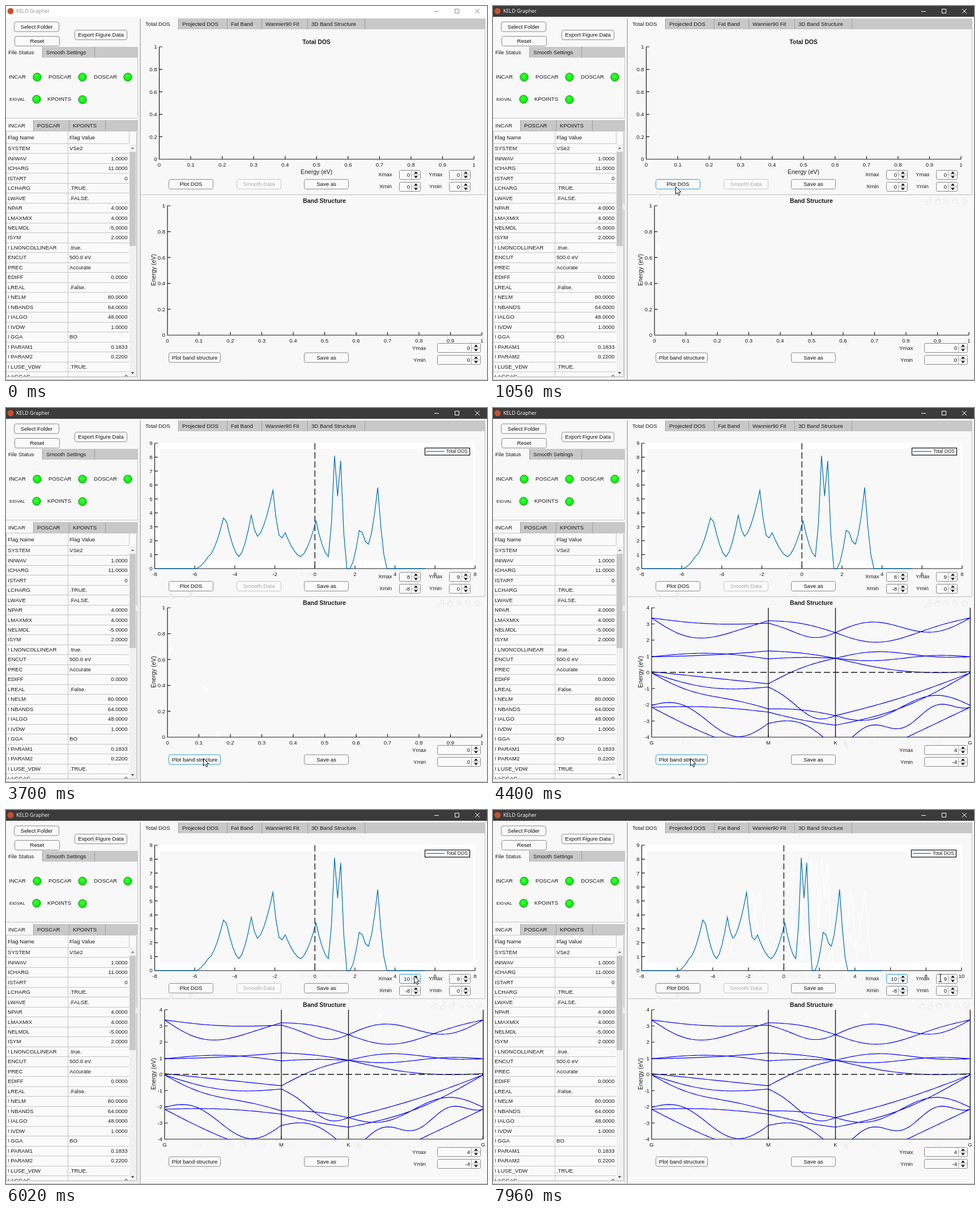
Animation, 849 px wide and 659 px high, one loop 8 s. Source, as an HTML page with a canvas:

```html
<!DOCTYPE html>
<html lang="en">
<head>
<meta charset="utf-8">
<title>KELD Grapher</title>
<style>
html, body { margin: 0; width: 849px; height: 659px; overflow: hidden; background: #f8f8f8; }
canvas { display: block; width: 849px; height: 659px; }
</style>
</head>
<body>
<canvas id="stage" width="849" height="659"></canvas>
<script>
const ctx = document.getElementById('stage').getContext('2d');
const LOOP = 8000, STEP = 76;
const BG = '#f8f8f8', INK = '#1a1a1a', GREY = '#c8c8c8', EDGE = '#8a8a8a', RULE = '#c4c4c4', FOCUS = '#2f9be0', FAINT = '#efefef';

// Turning points of the density curve: [sample, states].
const dosTurns = [[0, 0], [4, .85], [9.4, 4], [14, .86], [18, 3.83], [20, 2.32], [25, 5.62], [27.5, 2.13],
  [29, 2.57], [34, .86], [39, 3.42], [43, .86], [45, 8.1], [46, 5.2], [47, 7.74], [49, 0], [50, 0],
  [53.3, 3.2], [55.8, 1.7], [59, 5.82], [62, 0]];

// Band branches between two symmetry points: [from, to, bow, skew, ripple], in eV.
const stretches = [
  { x0: 280, x1: 486, branches: [
    [3.37, 3.2, -1.12, -.18], [3.37, 3.05, -.2], [.97, .84, .28], [.97, 1.33, -.07], [.05, -.7],
    [-.03, -.9, -.47], [-.03, -2.25, -.3, -.13], [-2.03, -3.15, -.53, .72], [-2.15, -2.45, .16], [-2.15, -5.1, -.26]] },
  { x0: 486, x1: 604.5, branches: [
    [3.2, 2.46, .19], [3.05, 2.46, -.44, .13], [1.33, .88, .09], [.84, .88, .07], [-.7, .88, .2],
    [-.9, -2.67, -.56, .24], [-2.25, -2.67, .14], [-2.45, -3.26, -.08], [-3.15, -4.7, .77]] },
  { x0: 604.5, x1: 842, branches: [
    [2.46, 3.37, -.14, .52], [2.46, 3.37, -.77, -.25], [.88, .97, .26, .17], [.88, .97, -.05, -.14], [.88, .05, -.37],
    [-2.67, -.03, -.18], [-3.26, -.03, -.5], [-2.67, -2.03, .25, -.6], [-4.7, -2.15, 0, 0, .77], [-6.1, -2.15]] }];

// Pointer waypoints: [time, x, y].
const waypoints = [[130, 619, 584], [290, 288, 417], [370, 228, 346], [520, 288, 322], [740, 322, 318],
  [3010, 322, 318], [3240, 348, 488], [3400, 370, 569], [3630, 348, 617], [4400, 348, 617], [4480, 417, 578],
  [4640, 587, 461], [4790, 656, 354], [5010, 708, 303], [5400, 720, 292], [6860, 720, 291],
  [7200, 707, 297], [7350, 705, 297], [7960, 789, 296]];

const tableRows = `SYSTEM|VSe2
INIWAV|1.0000
ICHARG|11.0000
ISTART|0
LCHARG|.TRUE.
LWAVE|.FALSE.
NPAR|4.0000
LMAXMIX|4.0000
NELMDL|-5.0000
ISYM|2.0000
! LNONCOLLINEAR|.true.
ENCUT|500.0 eV
PREC|Accurate
EDIFF|0.0000
LREAL|.False.
! NELM|80.0000
! NBANDS|64.0000
! IALGO|48.0000
! IVDW|1.0000
! GGA|BO
! PARAM1|0.1833
! PARAM2|0.2200
! LUSE_VDW|.TRUE.
LAGGAC|0`.split('\n').map(row => row.split('|'));

// ---- drawing helpers ----
const lerp = (a, b, u) => a + (b - a) * u;
function text(str, x, cy, { align = 'left', color = INK, size = 9.6, bold = false, font = '"Liberation Sans", Arial, sans-serif' } = {}) {
  ctx.font = `${bold ? 'bold ' : ''}${size}px ${font}`;
  ctx.textAlign = align;
  ctx.fillStyle = color;
  ctx.fillText(str, x, cy + size * 0.36);
}
function rect(x, y, w, h, color) {
  ctx.fillStyle = color;
  ctx.fillRect(x, y, w, h);
}
function lines(color, width, ...polylines) {
  ctx.strokeStyle = color;
  ctx.lineWidth = width;
  ctx.beginPath();
  for (const pts of polylines) pts.forEach(([x, y], i) => i ? ctx.lineTo(x, y) : ctx.moveTo(x, y));
  ctx.stroke();
}
const hline = (x0, x1, y, color, width = 1) => lines(color, width, [[x0, y], [x1, y]]);
const vline = (x, y0, y1, color, width = 1) => lines(color, width, [[x, y0], [x, y1]]);
function polygon(pts, fill, stroke) {
  ctx.beginPath();
  pts.forEach(([x, y]) => ctx.lineTo(x, y));
  ctx.closePath();
  ctx.fillStyle = fill;
  ctx.fill();
  if (stroke) { ctx.strokeStyle = stroke; ctx.lineWidth = 1; ctx.stroke(); }
}
const triangle = (cx, y, h, color, half = 3.5) => polygon([[cx - half, y], [cx + half, y], [cx, y + h]], color);
function disc(x, y, r, fill, stroke) {
  ctx.beginPath();
  ctx.arc(x, y, r, 0, 7);
  if (fill) { ctx.fillStyle = fill; ctx.fill(); }
  if (stroke) { ctx.strokeStyle = stroke; ctx.lineWidth = 1; ctx.stroke(); }
}
function roundBox(x, y, w, h, fill, stroke, r = 3) {
  ctx.beginPath();
  ctx.roundRect(x + .5, y + .5, w - 1, h - 1, r);
  ctx.fillStyle = fill;
  ctx.fill();
  ctx.strokeStyle = stroke;
  ctx.lineWidth = 1;
  ctx.stroke();
}
function dashed(from, to, color) {
  ctx.setLineDash([11, 5]);
  lines(color, 1.4, [from, to]);
  ctx.setLineDash([]);
}
function button(label, x, y, w, { focus, pressed, disabled } = {}) {
  roundBox(x, y, w, 18, pressed ? '#e4e4e4' : '#fafafa', focus ? FOCUS : disabled ? RULE : EDGE);
  text(label, x + w / 2, y + 8.7, { align: 'center', color: disabled ? '#a9a9a9' : '#111' });
}
function spinner(x, y, w, value, focus) {
  const cx = x + w - 8.5;
  roundBox(x, y, w, 17, '#fafafa', focus ? FOCUS : EDGE, 2);
  vline(x + w - 16.5, y + 1, y + 16, '#b5b5b5');
  hline(x + w - 16, x + w - 1, y + 8.5, '#b5b5b5');
  text(value, x + w - 19, y + 8.5, { align: 'right' });
  triangle(cx, y + 6.5, -4, '#111');
  triangle(cx, y + 10.5, 4, '#111');
}
function tabs(x, y, end, labels, edges) {
  rect(x, y, end - x, 19, GREY);
  rect(x, y, edges[0] - x, 20, BG);
  edges.forEach(edge => vline(edge + .5, y, y + 19, '#a0a0a0'));
  labels.forEach(([label, lx]) => text(label, lx, y + 9.5));
}
function lamp(x, y) {
  const glow = ctx.createRadialGradient(x - 1, y - 2, 1, x, y, 8);
  glow.addColorStop(0, '#3dff3d');
  glow.addColorStop(.7, '#06f006');
  glow.addColorStop(1, '#00c800');
  disc(x, y, 7.3, glow, '#4f8f4f');
}
// Ticks are [position, label] pairs and point into the plot.
function axes(x0, y0, x1, y1, xTicks, yTicks, color = INK) {
  lines(color, 1.2, [[x0, y0], [x0, y1], [x1, y1]],
    ...xTicks.map(([x]) => [[x, y1], [x, y1 - 5.5]]), ...yTicks.map(([y]) => [[x0, y], [x0 + 5.5, y]]));
  xTicks.forEach(([x, label]) => text(label, x, y1 + 9.5, { align: 'center', color }));
  yTicks.forEach(([y, label]) => text(label, x0 - 4, y, { align: 'right', color }));
}
function ticks(from, to, first, last, step) {
  const count = Math.round((last - first) / step);
  return Array.from({ length: count + 1 }, (_, i) =>
    [lerp(from, to, i / count), String(+(first + i * step).toFixed(1))]);
}

// ---- plots ----
function drawEmptyDos() {
  axes(270.5, 72, 826, 270, ticks(270.5, 826, 0, 1, .1), ticks(270, 72, 0, 1, .2));
  text('Energy (eV)', 548, 292, { align: 'center', size: 10.5 });
  text('Total DOS', 548, 63, { align: 'center', bold: true, size: 10.4 });
}
// Flat valleys, sharp peaks: each rise is a power of the distance from its valley.
function dosAt(sample) {
  const next = dosTurns.findIndex(([s], i) => i && s >= sample);
  const [a, b] = [dosTurns[next - 1], dosTurns[next]].sort((p, q) => p[1] - q[1]);
  return lerp(a[1], b[1], ((sample - a[0]) / (b[0] - a[0])) ** 1.6);
}
function drawDos(xMax, ghost) {
  const right = xMax > 8 ? 827 : 828, unit = (right - 262.5) / (xMax + 8);
  const toX = energy => 262.5 + (energy + 8) * unit;
  const last = Math.floor(xMax / 2) * 2;
  axes(262.5, 62, right, 283, ticks(262.5, toX(last), -8, last, 2), ticks(283, 62, 0, 9, 1), ghost ? FAINT : INK);
  const curve = Array.from({ length: 63 }, (_, i) => [toX(i * .154 - 5.95), 283 - 24.55 * dosAt(i)]);
  lines(ghost ? '#fff' : '#0072bd', 1.25, [[262.5, 283], ...curve, [toX(5.5), 283]]);
  dashed([toX(0), 62], [toX(0), 283], ghost ? '#fff' : INK);
  if (ghost) return;
  const lx = right - 89;
  rect(lx, 70, 80, 13, '#fff');
  ctx.strokeStyle = INK;
  ctx.lineWidth = 1.3;
  ctx.strokeRect(lx + .5, 70.5, 79, 12.5);
  hline(lx + 3, lx + 35, 76.5, '#0072bd', 1.25);
  text('Total DOS', lx + 38, 76.5, { size: 8.3 });
}
function drawDosHistory(xMax) {
  text('Energy (eV)', 548, 292, { align: 'center', size: 10.5, color: FAINT });
  rect(263, 61, 565, 222, '#fff');
  rect(272, 72, 553, 197, BG);
  for (let past = 8; past < xMax; past++) drawDos(past, true);
  drawDos(xMax);
}
function drawEmptyBands() {
  axes(285, 352, 840, 580, ticks(285, 840, 0, 1, .1), ticks(580, 352, 0, 1, .2));
}
function branchPoints(x0, x1, [from, to, bow = 0, skew = 0, ripple = 0]) {
  return Array.from({ length: 41 }, (_, i) => {
    const u = i / 40, wave = Math.sin(2 * Math.PI * u);
    const energy = lerp(from, to, u) + bow * Math.sin(Math.PI * u) + skew * wave + ripple * wave * wave;
    return [lerp(x0, x1, u), 466 - 28.5 * energy];
  });
}
function drawBands() {
  ticks(285, 840, 0, 1, .1).slice(1, -1).forEach(([x, s]) => text(s, x, 589, { align: 'center', color: FAINT }));
  axes(280, 352, 842, 580, [[280, 'G'], [486, 'M'], [604.5, 'K'], [842, 'G']], ticks(580, 352, -4, 4, 1));
  ctx.save();
  ctx.beginPath();
  ctx.rect(280, 352, 563, 228);
  ctx.clip();
  for (const { x0, x1, branches } of stretches) lines('#0000ff', 1.2, ...branches.map(b => branchPoints(x0, x1, b)));
  ctx.restore();
  for (const x of [486, 604.5, 842.3]) vline(x, 352, 580, INK, 1.4);
  dashed([280, 465.7], [842, 465.7], INK);
}

// Icons run leftwards from the house; the full set adds an export icon.
function toolbar(right, full, color) {
  const icon = (slot, ...shapes) => {
    ctx.save();
    ctx.translate(right - slot * 15.9, 344);
    lines(color, 1.1, ...shapes);
    ctx.restore();
  };
  icon(0, [[-6, 0], [0, -6], [6, 0]], [[-4, -1], [-4, 5], [-1, 5], [-1, 1], [1, 1], [1, 5], [4, 5], [4, -1]]);
  for (const slot of [1, 2]) {
    disc(right - slot * 15.9 - 1, 343, 4.5, null, color);
    icon(slot, [[-3, -1], [1, -1]], [[2, 2], [6, 6]]);
  }
  icon(2, [[-1, -3], [-1, 1]]);
  icon(3, [[-3, 5], [-6, 0], [-3, 1], [-3, -4], [-1, -1], [0, -6], [1, -1], [3, -5], [3, 0], [5, -3], [3, 5], [-3, 5]]);
  icon(4, [[0, -6], [0, 0], [-3, 1], [-5, 6], [4, 6], [4, -6], [0, -6]], [[-3, 1], [4, 1]]);
  if (full) icon(5, [[-5, 1], [-5, 5], [6, 5], [6, 2]], [[-3, 2], [0, -2], [5, -2]], [[2, -5], [5, -2], [2, 1]]);
}

// ---- pointer ----
function arrow(x, y, fill, stroke) {
  polygon([[0, 0], [0, 13], [3, 10.3], [5, 15], [7.3, 14], [5.3, 9.5], [9.3, 9.3]].map(([dx, dy]) => [x + dx + .5, y + dy + .5]), fill, stroke);
}
function drawTrail(t) {
  waypoints.forEach(([, x, y], i) => {
    const next = waypoints[i + 1];
    const inBands = x > 285 && x < 830 && y > 352 && y < 575;
    if (next && t >= next[0]) arrow(x, y, inBands ? '#fff' : FAINT);
  });
}
function drawPointer(t) {
  const i = waypoints.findLastIndex(([time]) => time <= t);
  if (i < 0) return;
  const a = waypoints[i], b = waypoints[i + 1] || a;
  const held = Math.floor((t - a[0]) / STEP) * STEP;
  const u = held / (b[0] - a[0] || 1);
  const x = Math.round(lerp(a[1], b[1], u)), y = Math.round(lerp(a[2], b[2], u));
  const overField = y > 292 && y < 306 && ((x > 694 && x < 717) || (x > 782 && x < 803));
  if (overField) lines('#111', 1, [[x - 2.5, y - 6.5], [x + 3.5, y - 6.5]], [[x + .5, y - 6.5], [x + .5, y + 6.5]], [[x - 2.5, y + 6.5], [x + 3.5, y + 6.5]]);
  else arrow(x, y, '#fff', '#111');
}

// ---- window ----
function drawTitleBar(active) {
  const color = active ? '#fff' : '#8c8c8c';
  rect(0, 0, 849, 19, active ? '#3b3b3b' : '#fff');
  disc(8, 9, 5.5, '#c8502c');
  text('KELD Grapher', 18, 9, { color, size: 9, font: '"Open Sans", sans-serif' });
  lines(color, 1, [[756, 9.5], [764, 9.5]], [[792.5, 5.5], [799.5, 5.5], [799.5, 12.5], [792.5, 12.5], [792.5, 5]],
    [[828, 5], [836, 13]], [[836, 5], [828, 13]]);
}
function drawTable(hover) {
  const rowH = 17.48;
  rect(0, 221, 230, 432, '#fafafa');
  text('Flag Name', 3, 232);
  text('Flag Value', 112, 232);
  ctx.save();
  ctx.beginPath();
  ctx.rect(0, 221, 232, 432.5);
  ctx.clip();
  tableRows.forEach(([name, value], i) => {
    const cy = 250.7 + i * rowH;
    const numeric = /^-?[\d.]+$/.test(value);
    hline(0, 217, Math.round(242 + i * rowH) + .5, RULE);
    text(name, 3, cy);
    text(value, numeric ? 214.5 : 112, cy, { align: numeric ? 'right' : 'left' });
  });
  ctx.restore();
  vline(109.5, 221, 653, RULE);
  vline(217.5, 221, 242, RULE);
  rect(218, 243, 11, 410, '#f1f1f1');
  rect(218, 257, 11, 166, hover ? '#a8a8a8' : GREY);
  triangle(223.5, 252, -3.5, EDGE, 3);
  triangle(223.5, 645, 3.5, '#555', 3);
  lines('#b0b0b0', 1, [[0.5, 221], [0.5, 653.5], [230.5, 653.5], [230.5, 221]]);
  hline(0, 230, 220.5, RULE);
}
function drawLeft(hover) {
  button('Select Folder', 14, 27.5, 80);
  button('Reset', 15, 53, 80);
  button('Export Figure Data', 121, 42, 93);
  tabs(0, 72, 232, [['File Status', 4], ['Smooth Settings', 71]], [64, 156]);
  lines(RULE, 1, [[232.5, 72], [232.5, 197.5], [0, 197.5]]);
  ['INCAR', 'POSCAR', 'DOSCAR'].forEach((label, i) => {
    text(label, i ? 75 + (i - 1) * 80 : 5, 125);
    lamp(55 + i * 80, 125.3);
  });
  text('EIGVAL', 6, 164, { size: 7.8 });
  text('KPOINTS', 73, 164);
  lamp(54, 164.3);
  lamp(135, 165);
  tabs(0, 201, 232, [['INCAR', 4], ['POSCAR', 55], ['KPOINTS', 118]], [48, 111, 175]);
  vline(232.5, 201, 657, RULE);
  drawTable(hover);
}

function draw(t) {
  const during = (from, to) => t >= from && t < to;
  const plotted = t >= 2610, banded = t >= 4000;
  const xMaxValue = t >= 6000 ? 10 : t >= 5720 ? 9 : plotted ? 8 : 0;
  const xMaxPlot = t >= 6400 ? 10 : t >= 6250 ? 9 : 8;

  rect(0, 0, 849, 659, BG);
  drawTitleBar(t >= 920);
  drawLeft(during(370, 450));
  vline(237, 22, 658, '#c0c0c0', 2);
  hline(0, 849, 658.5, '#c0c0c0');
  tabs(238, 22, 845, [['Total DOS', 246], ['Projected DOS', 311], ['Fat Band', 397], ['Wannier90 Fit', 458], ['3D Band Structure', 539]], [304, 390, 451, 532, 633]);
  lines('#c0c0c0', 1, [[845.5, 22], [845.5, 332.5], [238, 332.5]]);

  drawTrail(t);
  if (plotted) drawDosHistory(xMaxPlot); else drawEmptyDos();
  [['Xmax', 657, 297], ['Xmin', 659, 318], ['Ymax', 746, 297], ['Ymin', 747, 318], ['Ymax', 717, 603], ['Ymin', 719, 624]]
    .forEach(([s, x, y]) => text(s, x, y));
  spinner(694, 289, 38, xMaxValue, t >= 5640);
  spinner(694, 310, 38, plotted ? -8 : 0);
  spinner(782, 289, 38, plotted ? 9 : 0);
  spinner(782, 310, 38, 0);
  button('Plot DOS', 287, 305, 79, { focus: during(980, 3630), pressed: during(980, 1050) });
  button('Smooth Data', 407, 305, 79, { disabled: true });
  button('Save as', 526, 305, 79);

  if (banded) drawBands(); else drawEmptyBands();
  text('Band Structure', 562, 343, { align: 'center', bold: true, size: 10.5 });
  ctx.save();
  ctx.translate(260, 465);
  ctx.rotate(-Math.PI / 2);
  text('Energy (eV)', 0, 0, { align: 'center', size: 10.5 });
  ctx.restore();
  spinner(761, 594, 77, banded ? 4 : 0);
  spinner(761, 615, 77, banded ? -4 : 0);
  button('Plot band structure', 287, 610.5, 92, { focus: during(3630, 5640) });
  button('Save as', 526, 610.5, 79);

  const hovering = during(130, 370) || during(3090, 3480) || during(4480, 5400);
  const full = t >= 4480;
  if (t >= 130) toolbar(full ? 835 : 832, full, hovering ? '#6a6a6a' : '#ececec');
  drawPointer(t);
}

const start = performance.now();
function tick() {
  draw((performance.now() - start) % LOOP);
  requestAnimationFrame(tick);
}
tick();
</script>
</body>
</html>
```
